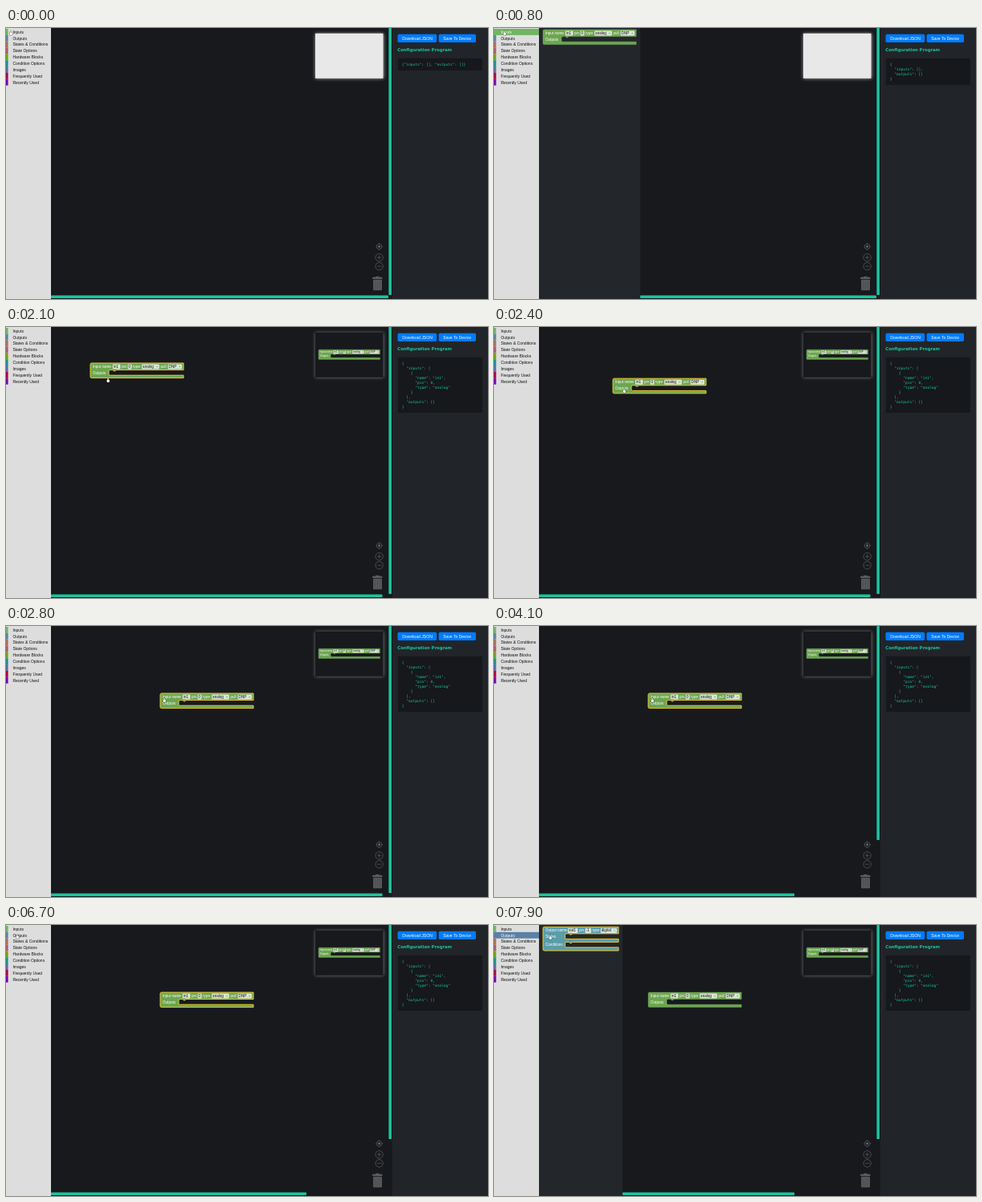
Recreate the animation shown at these times as an HTML page with a canvas. Size 600 by 338 pixels, loop 8000 ms.

```html
<!DOCTYPE html>
<html lang="en">
<head>
<meta charset="utf-8">
<title>Block editor</title>
<style>
html, body { margin: 0; width: 100%; height: 100%; overflow: hidden; background: #17191d; }
canvas { display: block; width: 100vw; height: 100vh; }
</style>
</head>
<body>
<canvas id="stage" width="600" height="338"></canvas>
<script>
const ctx = document.getElementById('stage').getContext('2d');
const LOOP = 8000, STEP = 100;
const SANS = '"Liberation Sans", Arial, sans-serif';
const MONO = '"DejaVu Sans Mono", monospace';
const DARK = '#17191d', PANEL = '#212529', TEAL = '#1cc5a0', YELLOW = '#f0cb35';
const GREEN = '#6ca650', CYAN = '#5b9da8';

const OPEN_INPUTS = 500, DRAG = 1600, CREATED = 1900, DROP = 3000, OPEN_OUTPUTS = 7000;

// Keys are [time, x, y]
const cursorPath = [
  [0, 6, 6], [400, 12, 6], [800, 13, 6], [1000, 14, 6], [1500, 64, 11],
  [1600, 67, 14], [2100, 127, 66], [2700, 197, 92], [5700, 197, 92], [6600, 14, 14],
  [7000, 14, 14], [7500, 96, 23], [7600, 71, 27], [7800, 71, 27], [7900, 70, 15]
];
const blockPath = [[1500, 61, 2], [1600, 62, 3], [2100, 105, 45], [2700, 191, 83.4], [2800, 192, 84]];

const categories = [
  ['Inputs', '#70b562'], ['Outputs', '#5b80a5'], ['States & Conditions', '#a5705b'],
  ['State Options', '#a55b70'], ['Hardware Blocks', '#74a010'], ['Condition Options', '#16918a'],
  ['Images', '#5b67a5'], ['Frequently Used', '#a8003c'], ['Recently Used', '#7600a8']
];

const inputBlock = {
  w: 116, color: GREEN, bays: [['Outputs', 8.6]], slot: 23, bottom: 18.6,
  row: [['Input name', 3], ['in1', 27.8, 9.6], ['pin', 39], ['0', 46.5, 5], ['type', 53.3],
        ['analog', 64, 21.8, true], ['pull', 87.5], ['DNP', 96.5, 17.5, true]]
};
const outputBlock = {
  w: 94, color: CYAN, bays: [['States', 8.4], ['Conditions', 18.9]], slot: 27.5, bottom: 29.6,
  row: [['Output name', 3], ['out1', 30.8, 12.5], ['pin', 45], ['-1', 52.5, 7.5], ['type', 61.5],
        ['digital', 71.7, 20.3, true]]
};

function follow(path, t) {
  if (t <= path[0][0]) return path[0].slice(1);
  for (let i = 1; i < path.length; i++) {
    const [t0, x0, y0] = path[i - 1], [t1, x1, y1] = path[i];
    if (t <= t1) {
      const k = (t - t0) / (t1 - t0);
      return [x0 + (x1 - x0) * k, y0 + (y1 - y0) * k];
    }
  }
  return path[path.length - 1].slice(1);
}

function rect(x, y, w, h, color) {
  ctx.fillStyle = color;
  ctx.fillRect(x, y, w, h);
}

function round(x, y, w, h, r, color) {
  ctx.beginPath();
  ctx.roundRect(x, y, w, h, r);
  ctx.fillStyle = color;
  ctx.fill();
}

function text(str, x, y, size, color, family = SANS, weight = 'normal') {
  ctx.font = `${weight} ${size}px ${family}`;
  ctx.fillStyle = color;
  ctx.textBaseline = 'alphabetic';
  ctx.fillText(str, x, y);
}

function blockShape({ w, bays, slot, bottom }) {
  const p = new Path2D();
  p.moveTo(1.5, 0);
  p.lineTo(w, 0);
  for (const [, y] of bays) {
    p.lineTo(w, y);
    p.lineTo(slot + 9, y);
    p.lineTo(slot + 8, y + 1.2);
    p.lineTo(slot + 6, y + 1.2);
    p.lineTo(slot + 5, y);
    p.lineTo(slot + 1.5, y);
    p.quadraticCurveTo(slot, y, slot, y + 1.5);
    p.lineTo(slot, y + 5);
    p.quadraticCurveTo(slot, y + 6.6, slot + 1.5, y + 6.6);
    p.lineTo(w, y + 6.6);
  }
  p.lineTo(w, bottom);
  p.lineTo(1.5, bottom);
  p.quadraticCurveTo(0, bottom, 0, bottom - 1.5);
  p.lineTo(0, 1.5);
  p.quadraticCurveTo(0, 0, 1.5, 0);
  p.closePath();
  return p;
}

function drawBlock(block, x, y, selected, scale = 1) {
  ctx.save();
  ctx.translate(x, y);
  ctx.scale(scale, scale);
  const shape = blockShape(block);
  ctx.fillStyle = block.color;
  ctx.fill(shape);
  ctx.lineWidth = selected ? 1 : 0.4;
  ctx.strokeStyle = selected ? YELLOW : '#8dbb78';
  if (selected || block.color === GREEN) ctx.stroke(shape);
  for (const [label, px, width, menu] of block.row) {
    if (width) round(px, 1.6, width, 5.9, 1, '#dce6d6');
    text(label, px + (width ? 1.1 : 0), 6, 4.58, width ? '#111' : '#fff');
    if (menu) {
      ctx.beginPath();
      ctx.moveTo(px + width - 4, 4);
      ctx.lineTo(px + width - 1.6, 4);
      ctx.lineTo(px + width - 2.8, 5.4);
      ctx.fillStyle = block.color;
      ctx.fill();
    }
  }
  for (const [label, top] of block.bays) text(label, 3, top + 5.1, 4.58, '#fff');
  ctx.restore();
}

function drawSidebar(active) {
  rect(0, 0, 56, 338, '#dddddd');
  categories.forEach(([label, color], i) => {
    const y = 1 + i * 7.85, on = i === active;
    rect(0, y, on ? 56 : 2.6, 7.85, color);
    text(label, 8.4, y + 5.7, 5, on ? '#fff' : '#111');
  });
}

function drawControls() {
  const x = 464.6;
  ctx.strokeStyle = '#55585b';
  ctx.lineWidth = 0.8;
  const line = (x0, y0, x1, y1) => {
    ctx.beginPath();
    ctx.moveTo(x0, y0);
    ctx.lineTo(x1, y1);
    ctx.stroke();
  };
  const ring = (y, r) => {
    ctx.beginPath();
    ctx.arc(x, y, r, 0, Math.PI * 2);
    ctx.stroke();
  };
  ring(272.7, 3.3);
  for (const [dx, dy] of [[1, 0], [-1, 0], [0, 1], [0, -1]])
    line(x + dx * 3, 272.7 + dy * 3, x + dx * 4.7, 272.7 + dy * 4.7);
  ctx.beginPath();
  ctx.arc(x, 272.7, 1.4, 0, Math.PI * 2);
  ctx.fillStyle = '#6a6d70';
  ctx.fill();
  for (const y of [286.2, 297.2]) {
    ring(y, 4.7);
    line(x - 2.5, y, x + 2.5, y);
  }
  line(x, 283.7, x, 288.7);
  rect(460, 309.8, 4.5, 1.2, '#5b5d60');
  round(456, 310.8, 12.5, 2.2, 0.8, '#5b5d60');
  round(457, 313.8, 11, 13.4, 1, '#55575a');
  for (const bar of [459.4, 462.2, 465]) rect(bar, 315.5, 0.6, 9.7, '#484a4d');
}

function drawMinimap(filled) {
  ctx.save();
  ctx.shadowColor = filled ? '#777' : '#aaa';
  ctx.shadowBlur = 4;
  rect(385, 6.8, 84.5, 56, filled ? DARK : '#e8e8e8');
  ctx.restore();
  if (filled) drawBlock(inputBlock, 389, 28.2, false, 0.66);
}

function codeLines(t) {
  if (t < OPEN_INPUTS) return ['{"inputs": [], "outputs": []}'];
  if (t < CREATED) return ['{', '  "inputs": [],', '  "outputs": []', '}'];
  return ['{', '  "inputs": [', '    {', '      "name": "in1",', '      "pin": 0,',
    '      "type": "analog"', '    }', '  ],', '  "outputs": []', '}'];
}

function drawPanel(t) {
  rect(481, 0, 119, 338, PANEL);
  round(487.5, 7.7, 48.7, 10.4, 1.8, '#007bff');
  round(538.6, 7.7, 46.4, 10.4, 1.8, '#007bff');
  text('Download JSON', 493.2, 14.8, 5.1, '#fff');
  text('Save To Device', 544.2, 14.8, 5, '#fff');
  text('Configuration Program', 487.3, 29.4, 5.27, TEAL, '"DejaVu Sans", sans-serif', 'bold');
  const lines = codeLines(t);
  round(487.8, 37.7, 105.2, 9.2 + lines.length * 6, 1.5, '#16181b');
  lines.forEach((line, i) => text(line, 492.8, 46.8 + i * 6, 4.56, TEAL, MONO));
}

function drawCursor([x, y]) {
  ctx.beginPath();
  ctx.roundRect(x - 0.7, y - 2.2, 1.3, 3, 0.6);
  ctx.roundRect(x - 1.5, y - 0.2, 3.4, 3.1, 1.1);
  ctx.strokeStyle = '#222';
  ctx.lineWidth = 0.8;
  ctx.stroke();
  ctx.fillStyle = '#fff';
  ctx.fill();
}

function render(t) {
  const inputsOpen = t >= OPEN_INPUTS && t < DRAG;
  const outputsOpen = t >= OPEN_OUTPUTS;
  const flyoutEnd = inputsOpen ? 182 : outputsOpen ? 160 : 56;

  rect(0, 0, 600, 338, DARK);
  drawControls();
  drawMinimap(t >= CREATED);
  if (t >= DRAG) drawBlock(inputBlock, ...follow(blockPath, t), !outputsOpen);

  const right = t < DRAG ? 476 : t < DROP ? 468.5 : 374;
  round(flyoutEnd, 333.6, right - flyoutEnd, 3.4, 0.8, TEAL);
  round(476.4, 0, 3.5, t < DROP ? 333 : 267, 0.8, TEAL);

  if (flyoutEnd > 56) rect(56, 0, flyoutEnd - 56, 338, '#23272b');
  if (inputsOpen) drawBlock(inputBlock, 61, 2, t >= 1400);
  if (outputsOpen) drawBlock(outputBlock, 61, 2.4, t >= 7300);

  drawSidebar(inputsOpen ? 0 : outputsOpen ? 1 : -1);
  drawPanel(t);
  drawCursor(follow(cursorPath, t));
}

const start = performance.now();
function tick() {
  const elapsed = (performance.now() - start) % LOOP;
  render(Math.floor(elapsed / STEP) * STEP);
  requestAnimationFrame(tick);
}
tick();
</script>
</body>
</html>
```
